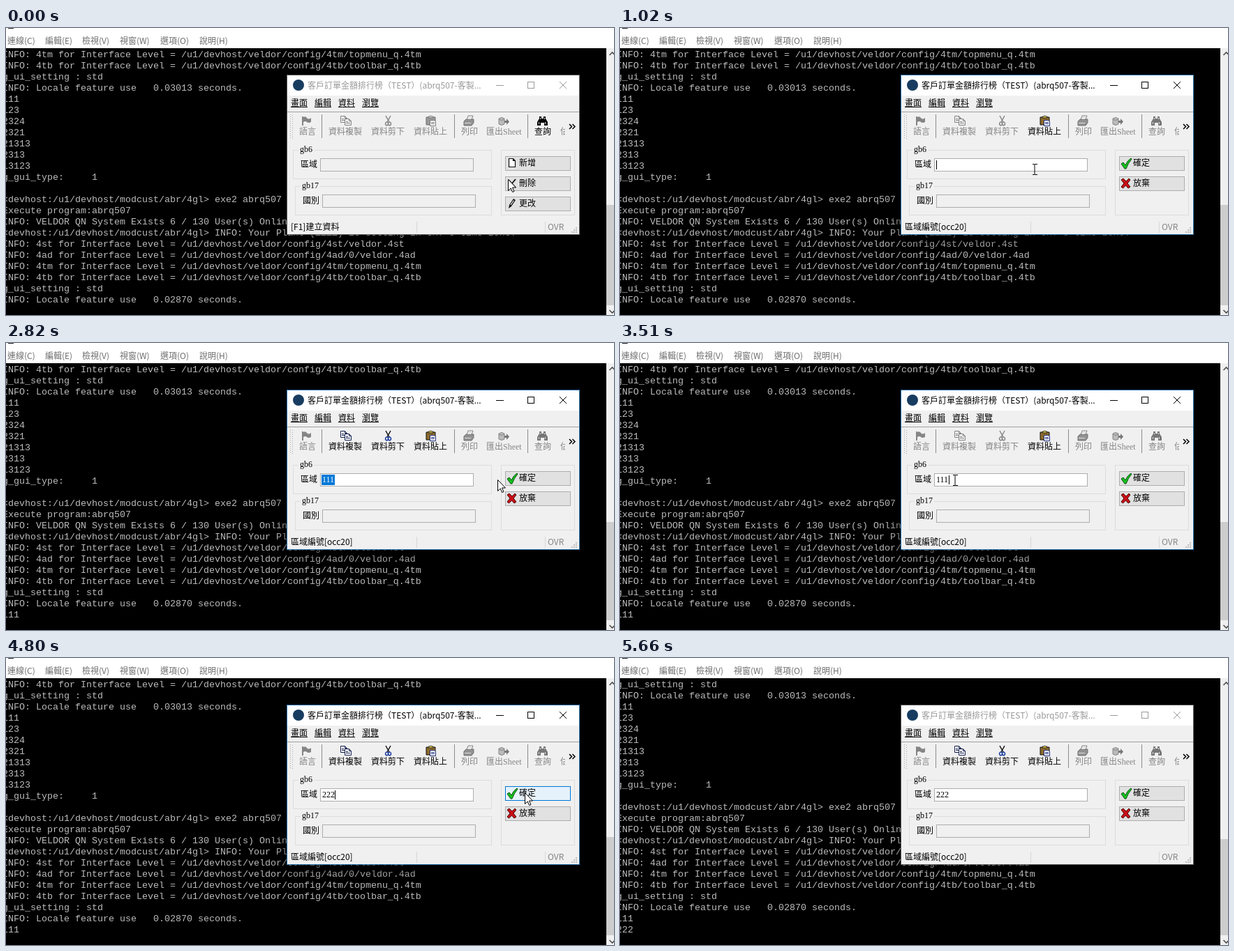
These frames come from a looping animation (871x412 px, 5750 ms). An HTML page with a canvas:

```html
<!DOCTYPE html>
<html lang="zh-Hant">
<head>
<meta charset="utf-8">
<style>
html, body { margin: 0; width: 100%; height: 100%; overflow: hidden; background: #fff; }
canvas { display: block; }
</style>
</head>
<body>
<canvas id="stage" width="871" height="412"></canvas>
<script>
const ctx = document.getElementById('stage').getContext('2d');
const LOOP = 5750;
const SANS = '12px "Noto Sans CJK TC", "Noto Sans CJK", sans-serif';
const MING = '12px "Liberation Serif", "Noto Sans CJK TC", "Noto Sans CJK", serif';
const MONO = '13.333px "Liberation Mono", monospace';
const GRAY = '#858585';

// Moments at which the screen was refreshed: [first, last, count]
const refreshes = [[0, 0, 1], [70, 100, 2], [250, 480, 4], [620, 1020, 6], [1170, 1730, 8],
  [1810, 1960, 3], [2040, 2190, 3], [2340, 2340, 1], [2520, 2590, 2], [2740, 2820, 2],
  [2880, 3040, 3], [3270, 3510, 4], [3740, 4270, 8], [4330, 4880, 8], [4960, 5020, 2],
  [5110, 5340, 4], [5510, 5510, 1], [5660, 5660, 1]]
  .flatMap(([a, b, n]) => Array.from({ length: n }, (_, i) =>
    Math.round(a + (b - a) * i / Math.max(1, n - 1))));

// Pointer path: [time, x, y]
const path = [[0, 719, 217], [70, 720, 199], [100, 720, 181], [250, 721, 187], [700, 721, 187],
  [1020, 594, 203], [1490, 594, 203], [1730, 697, 199], [1960, 743, 193], [2340, 743, 193],
  [2520, 700, 190], [2590, 661, 190], [2740, 664, 192], [2820, 704, 196], [2880, 727, 194],
  [3040, 743, 193], [3190, 743, 193], [3510, 480, 197], [3740, 455, 197], [3890, 310, 212],
  [3970, 310, 214], [4120, 520, 221], [4270, 594, 214], [4480, 594, 214], [4640, 690, 181],
  [4800, 743, 193], [4880, 743, 193], [4960, 742, 222], [5020, 740, 250], [5340, 735, 400]];

const typed = [[0, ''], [1170, '1'], [1330, '11'], [1410, '111'], [4270, '2'], [4330, '22'], [4400, '222']];

const level = (kind, file) => `INFO: ${kind} for Interface Level = /u1/devhost/veldor/config/${file}`;
const prompt = '<devhost:/u1/devhost/modcust/abr/4gl> ';
const menuLines = [level('4tm', '4tm/topmenu_q.4tm'), level('4tb', '4tb/toolbar_q.4tb'), 'g_ui_setting : std'];
const locale = s => `INFO: Locale feature use   ${s} seconds.`;
const log = [...menuLines, locale('0.03013'),
  '111', '123', '2324', '2321', '21313', '2313', '13123', 'g_gui_type:     1', '',
  prompt + 'exe2 abrq507', 'Execute program:abrq507',
  'INFO: VELDOR QN System Exists 6 / 130 User(s) Online.',
  prompt + 'INFO: Your Plant (ZZZZ) is setting in GMT+8 time zone.',
  level('4st', '4st/veldor.4st'), level('4ad', '4ad/0/veldor.4ad'),
  ...menuLines, locale('0.02870'), '111', '222'];

const within = (t, a, b) => t >= a && t < b;

function rect(x, y, w, h, fill, border) {
  ctx.fillStyle = border || fill;
  ctx.fillRect(x, y, w, h);
  if (border) rect(x + 1, y + 1, w - 2, h - 2, fill);
}

function frame(x, y, w, h, color) {
  ctx.strokeStyle = color;
  ctx.lineWidth = 1;
  ctx.strokeRect(x + .5, y + .5, w - 1, h - 1);
}

function text(s, x, baseline, color = '#000', font = MING) {
  ctx.font = font;
  ctx.fillStyle = color;
  ctx.fillText(s, x, baseline);
}

function shape(d, x, y, fill, stroke, width = 1) {
  const p = new Path2D(d);
  ctx.save();
  ctx.translate(x, y);
  ctx.lineWidth = width;
  if (fill) { ctx.fillStyle = fill; ctx.fill(p); }
  if (stroke) { ctx.strokeStyle = stroke; ctx.stroke(p); }
  ctx.restore();
}

const icons = {
  flag: (x, y, c) => shape('M1 1h2v13h-2zM3 2q3-2 5 1t6 0v6q-4 2-6 0t-5 0z', x, y, c),
  copy: (x, y, on) => {
    const c = on ? '#15204f' : GRAY;
    for (const [dx, dy] of [[0, 0], [6, 4]]) {
      shape('M.5 .5h6l3 3v6h-9z M6.5 .5v3h3', x + dx, y + dy, on ? '#fff' : '#eee', c);
      shape('M2 4.5h3M2 6.5h6', x + dx, y + dy, null, c);
    }
  },
  cut: (x, y, on) => {
    shape('M3 0l5 9M10 0l-5 9', x, y, null, on ? '#111' : GRAY, 1.5);
    shape('M5 9a2 2.4 0 1 0 .1 0M9 9a2 2.4 0 1 0 .1 0', x - .5, y, null, on ? '#16389c' : GRAY, 1.5);
  },
  paste: (x, y, on) => {
    shape('M1 2h13v11h-13z', x, y, on ? '#8b6a2c' : '#999', on ? '#111' : '#707070');
    shape('M4 3v-2h2l1.500-1 1.500 1h2v2z', x, y, on ? '#f2d84a' : '#ccc', on ? '#222' : '#777');
    shape('M6.500 6.500h6l2 2v6h-8z M8 9.500h5M8 11.500h5', x, y, '#fff', on ? '#1d2c7c' : '#777');
  },
  print: (x, y) => {
    shape('M5 6l2-6h7l-2 6z', x, y, '#eee', GRAY);
    shape('M1 8l3-3h11v5l-3 4h-11z', x, y, '#929292', '#707070');
    shape('M2 10.500h9M7 2.500h5M6 4.500h5', x, y, null, '#ddd');
  },
  exportTo: (x, y) => {
    shape('M1 4q4-3 8 0v8q-4 3-8 0z', x, y, '#bbb', GRAY);
    shape('M1 5q4 3 8 0', x, y, null, GRAY);
    shape('M9 7h3v-3l4 4.500-4 4.500v-3h-3z', x, y, '#777');
  },
  find: (x, y, on) => {
    const c = on ? '#000' : '#777';
    shape('M3 1h3v3h3v-3h3v3l3 5v5h-5v-4h-5v4h-5v-5l3-5z', x, y, c);
    shape('M2.500 9v3M11.500 9v3M4.500 3v2M10.500 3v2', x, y, null, '#ddd');
  },
  page: (x, y) => shape('M1.500 .5h6l3 3v9h-9zM7.500 .5v3h3', x, y, '#fff', '#111', 1.2),
  strike: (x, y) => shape('M1 2l10 11M11 1l-10 12', x, y, null, '#111', 1.8),
  pencil: (x, y) => {
    shape('M1 15l1-5 6-9 3 2-6 9z', x, y, '#111');
    shape('M4 10l4.500-6.500', x, y, null, '#fff', 1.2);
  },
  tick: (x, y) => shape('M1 9l3-2 3 4q3-7 8-10l1 1q-5 6-8 14h-2z', x, y, '#13c31d', '#0b4d12'),
  cross: (x, y) => shape('M1 3l3-2 4 4 4-4 2 2-4 5 4 5-3 2-3.500-4-4 4-2.500-2 4-5z', x, y, '#c90f16', '#4a0808'),
};

function drawTerminal(scroll) {
  rect(0, 0, 871, 412, '#fff');
  rect(3, 0, 8, 1, '#222');
  [['連線(C)', 2], ['編輯(E)', 56], ['檢視(V)', 109], ['視窗(W)', 163], ['選項(O)', 221], ['說明(H)', 277]]
    .forEach(([s, x]) => text(s, x, 23, '#6d6d6d', SANS));
  rect(0, 29, 860, 383, '#000');
  log.slice(scroll, 23 + scroll).forEach((line, i) => text(line, -5, 42 + 16 * i, '#bbb', MONO));
  rect(860, 29, 11, 383, '#f0f0f0');
  const top = 254 + 3 * scroll;
  rect(860, top, 11, 398 - top, '#cdcdcd');
  shape('M-4 2l4-4 4 4', 868.5, 37, null, '#505050', 1.6);
  shape('M-4-2l4 4 4-4', 868.5, 407, null, '#505050', 1.6);
}

function drawTitle(active) {
  ctx.save();
  ctx.shadowColor = active ? 'rgba(0,0,0,.75)' : 'rgba(0,0,0,.4)';
  ctx.shadowBlur = active ? 20 : 10;
  ctx.shadowOffsetY = active ? 4 : 2;
  rect(402, 67, 420, 230, active ? '#2470ad' : '#5a5a5a');
  ctx.restore();
  rect(403, 68, 418, 228, '#f0f0f0');
  rect(403, 68, 418, 29, '#fff');
  ctx.fillStyle = '#183c60';
  ctx.beginPath();
  ctx.arc(419, 82, 8, 0, 7);
  ctx.fill();
  const ink = active ? '#000' : '#999';
  text('客戶訂單金額排行榜（TEST）(abrq507-客製...', 432, 87, ink, SANS);
  rect(702, 82, 11, 1, ink);
  frame(747, 77, 10, 10, ink);
  shape('M0 0l10 10M10 0l-10 10', 793, 77, null, ink);
}

function drawToolbar(input, clip) {
  [['畫面', 408], ['編輯', 442], ['資料', 476], ['瀏覽', 510]].forEach(([s, x]) => {
    text(s, x, 112);
    rect(x, 113, 24, 1, '#000');
  });
  rect(403, 120, 418, 1, '#a0a0a0');
  for (let y = 124; y < 160; y += 3) {
    rect(407, y, 1, 1, '#aaa');
    rect(410, y + 1, 1, 1, '#aaa');
  }
  [452, 642, 747].forEach(x => rect(x, 124, 1, 34, '#8c8c8c'));
  [['語言', 420, 'flag', 423], ['資料複製', 462, 'copy', 479, clip], ['資料剪下', 523, 'cut', 541, clip],
    ['資料貼上', 584, 'paste', 601, input], ['列印', 652, 'print', 655],
    ['匯出Sheet', 688, 'exportTo', 705], ['查詢', 757, 'find', 761, !input]]
    .forEach(([s, x, icon, ix, on]) => {
      icons[icon](ix, 126, icon === 'flag' ? GRAY : on);
      text(s, x, 153, on ? '#000' : GRAY);
    });
  ctx.save();
  ctx.beginPath();
  ctx.rect(793, 140, 8, 20);
  ctx.clip();
  text('估', 794, 153, GRAY);
  ctx.restore();
  shape('M0 0l3.500 3.500-3.500 3.500M4.500 0l3.500 3.500-3.500 3.500', 807, 138, null, '#000', 1.5);
}

function drawGroup(x, y, w, h, title) {
  frame(x, y, w, h, '#dcdcdc');
  if (!title) return;
  rect(x + 8, y, title.length * 6 + 4, 1, '#f0f0f0');
  text(title, x + 10, y + 3);
}

function drawForm(input, value, selected, caret) {
  drawGroup(411, 175, 285, 42, 'gb6');
  drawGroup(414, 227, 282, 42, 'gb17');
  drawGroup(709, 175, 106, 94);
  text('區域', 422, 200);
  text('國別', 425, 252);
  rect(450, 187, 220, 19, input ? '#fff' : '#f0f0f0', '#adadad');
  rect(453, 239, 220, 19, '#f0f0f0', '#adadad');
  const end = 453 + value.length * 6;
  if (selected) rect(452, 189, end - 452, 15, '#0078d7');
  text(value, 453, 200, selected ? '#fff' : '#000');
  if (caret) rect(end, 190, 1, 13, '#000');
}

function drawButtons(input, x, y, hoverable, pressed) {
  const list = input ? [['確定', 'tick', 717, 2], ['放棄', 'cross', 717, 2]]
    : [['新增', 'page', 719, 3], ['刪除', 'strike', 719, 3], ['更改', 'pencil', 719, 2]];
  list.forEach(([label, icon, ix, dy], i) => {
    const top = 184 + 29 * i;
    const hover = hoverable && within(x, 715, 809) && within(y, top, top + 21);
    const down = hover && pressed;
    rect(715, top, 94, 21, down ? '#cce4f7' : hover ? '#e5f1fb' : '#e1e1e1',
      down ? '#005499' : hover ? '#0078d7' : '#adadad');
    icons[icon](ix, top + dy);
    text(label, 735, top + 14);
  });
}

function drawStatus(input) {
  text(input ? '區域編號[occ20]' : '[F1]建立資料', 408, 290, '#000', SANS);
  rect(588, 278, 1, 16, '#d7d7d7');
  rect(772, 278, 1, 16, '#d7d7d7');
  text('OVR', 776, 290, GRAY, SANS);
  for (let row = 0; row < 3; row++)
    for (let col = 0; col <= row; col++) rect(816 - 3 * col, 286 + 3 * row, 2, 2, '#bfbfbf');
}

function drawPointer(x, y, beam) {
  if (beam) shape('M-3-7.500h2.500q.5 0 .5.5v14q0 .5-.5.5h-2.500M4-7.500h-3.500q-.5 0-.5.5M0 7q0 .5.5.5h3.500', x, y, null, '#000');
  else shape('M.5 .5v16l3.700-3.500 2.500 5.500 2.300-1-2.500-5.500h5z', x, y, '#fff', '#000');
}

function pointerAt(t) {
  const i = path.findIndex(k => k[0] > t);
  if (i < 0) return path[path.length - 1].slice(1);
  const [a, b] = [path[i - 1], path[i]];
  const f = (t - a[0]) / (b[0] - a[0]);
  return [1, 2].map(k => Math.round(a[k] + (b[k] - a[k]) * f));
}

function draw(now) {
  const t = refreshes.findLast(r => r <= now);
  const active = within(t, 250, 5660);
  const input = t >= 700;
  const scroll = (t >= 2110) + (t >= 4960);
  const value = typed.findLast(k => k[0] <= t)[1];
  const selected = within(t, 2110, 3500) || within(t, 3810, 4270) || within(t, 4960, 5660);
  const clip = within(t, 2110, 3500) || t >= 3810;
  const caret = input && active && !within(t, 2340, 2870) && t < 5510;
  const dragging = within(t, 3500, 4000);
  const pressed = within(t, 320, 450) || within(t, 2040, 2110) || within(t, 4880, 4960);
  const [x, y] = pointerAt(t);

  drawTerminal(scroll);
  drawTitle(active);
  drawToolbar(input, clip);
  drawForm(input, value, selected, caret);
  drawButtons(input, x, y, active && !dragging && t < 5340, pressed);
  drawStatus(input);
  if (t < 5340) {
    const overField = input && within(x, 450, 670) && within(y, 187, 206);
    drawPointer(x, y, dragging || overField);
  }
}

const start = performance.now();
function tick() {
  draw((performance.now() - start) % LOOP);
  requestAnimationFrame(tick);
}
tick();
</script>
</body>
</html>
```
